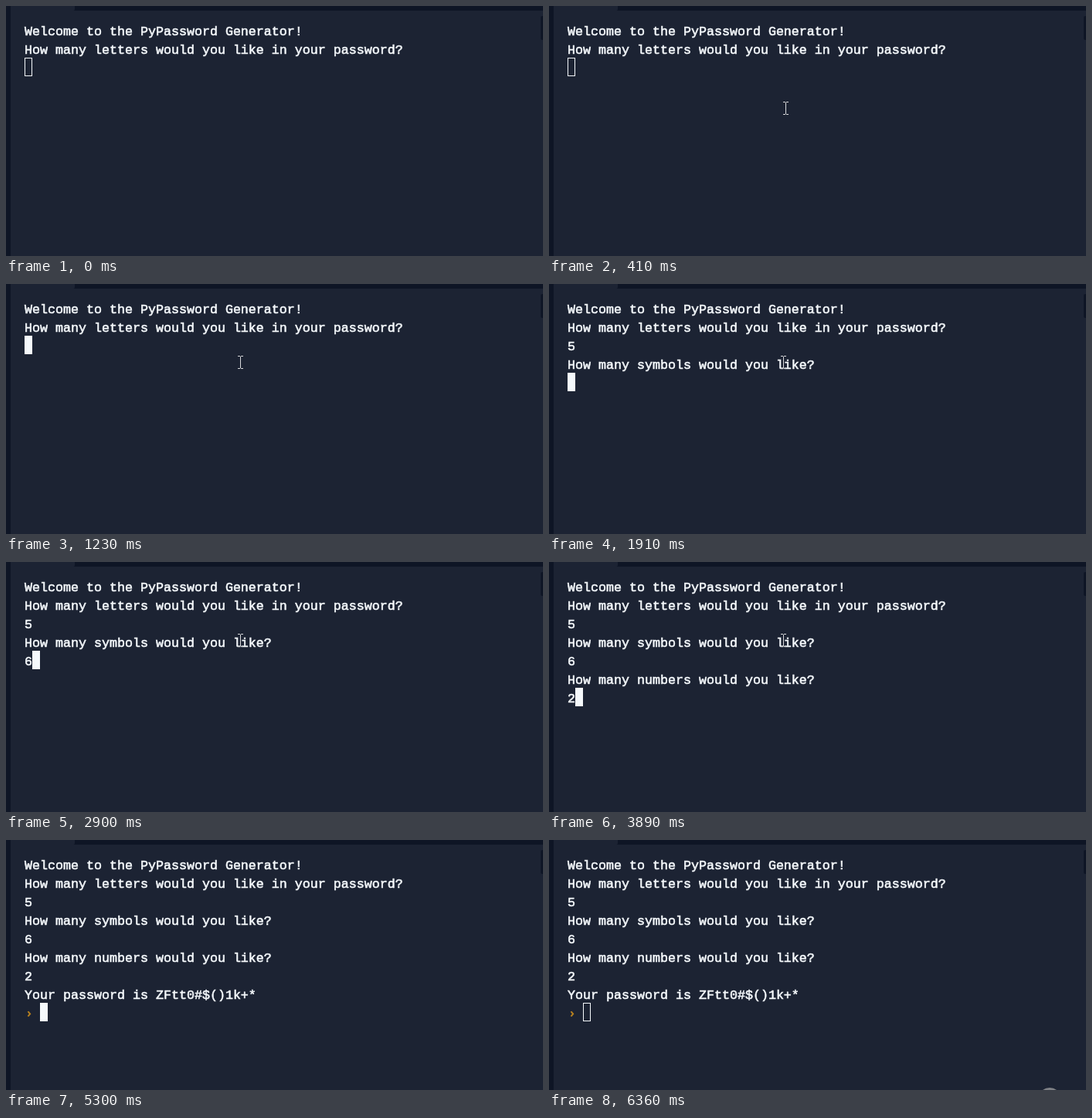
These frames come from a looping animation (695x324 px, 6580 ms). An HTML page:

```html
<!DOCTYPE html>
<html lang="en">
<head>
<meta charset="utf-8">
<title>Password generator</title>
<style>
html, body { margin: 0; width: 100%; height: 100%; overflow: hidden; background: #0e1525; }
div, pre, svg { position: absolute; box-sizing: border-box; }
#stage { left: 0; top: 0; width: 695px; height: 324px; overflow: hidden; }
#tab { left: 6px; top: 0; width: 83px; height: 6px; background: #1c2333; border-radius: 0 0 2px 0; }
#panel { left: 6px; top: 6px; width: 689px; height: 318px; background: #1c2333; }
#bar { left: 692px; top: 13px; width: 3px; height: 31px; background: #0e1525; border-radius: 2px 0 0 2px; }
#text {
  left: 24px; top: 22px; margin: 0; color: #f5f9fc;
  font: 16.667px/24px "Liberation Mono", monospace;
  -webkit-text-stroke: .6px #f5f9fc;
}
#prompt { left: 25px; top: 212px; color: #b9821f; font: 700 16.667px/24px "Noto Sans Mono", monospace; }
#caret { width: 10px; height: 24px; border: 1px solid #f5f9fc; }
#caret.focus { background: #f5f9fc; }
#click { width: 30px; height: 30px; border-radius: 50%; background: rgba(170, 170, 170, .7); }
#mouse { width: 8px; height: 17px; }
</style>
</head>
<body>
<div id="stage">
  <div id="tab"></div>
  <div id="panel"></div>
  <div id="bar"></div>
  <pre id="text"></pre>
  <div id="prompt">›</div>
  <div id="caret"></div>
  <div id="click"></div>
  <svg id="mouse" viewBox="0 0 8 17" fill="none" stroke="#d9dadc" shape-rendering="crispEdges">
    <path d="M0 .5H3M4 .5H7M3.5 1V16M0 16.5H3M4 16.5H7"/>
  </svg>
</div>
<script>
const LOOP = 6580;
const STEP = 68;
const $ = id => document.getElementById(id);

// Terminal output: [time, text added]
const output = [
  [0, "Welcome to the PyPassword Generator!\nHow many letters would you like in your password?\n"],
  [1830, "5"],
  [1910, "\nHow many symbols would you like?\n"],
  [2900, "6"],
  [2960, "\nHow many numbers would you like?\n"],
  [3890, "2"],
  [4020, "\nYour password is ZFtt0#$()1k+*\n  "]
];

// Pointer positions, one per STEP from the start of each move
const enter = [[535, 282], [455, 254], [384, 211], [337, 158], [306, 132], [304, 119], [303, 109], [303, 103], [303, 101]];
const leave = [[309, 101], [324, 95], [352, 101], [394, 124], [446, 166], [505, 217], [565, 270], [619, 317], [650, 337]];
const sample = (path, age) => path[Math.min(path.length - 1, Math.floor(age / STEP))];

function show(id, visible) {
  $(id).style.display = visible ? "block" : "none";
}

function place(id, x, y) {
  $(id).style.left = x + "px";
  $(id).style.top = y + "px";
}

function draw(t) {
  const text = output.filter(([start]) => t >= start).map(([, part]) => part).join("");
  const lines = text.split("\n");
  if ($("text").textContent !== text) $("text").textContent = text;
  show("prompt", t >= 4020);
  place("caret", 24 + 10 * lines.at(-1).length, 19 + 24 * (lines.length - 1));
  $("caret").className = t >= 1030 && t < 6360 ? "focus" : "";

  const [x, y] = t < 4750 ? sample(enter, Math.max(0, t - 130)) : sample(leave, t - 4750);
  place("mouse", x - 3, y - 8);
  show("mouse", t >= 130);

  place("click", x - 17, y - 16);
  show("click", t >= 960 && t < 1230 || t >= 6360);
}

function tick() {
  draw(performance.now() % LOOP);
  requestAnimationFrame(tick);
}
tick();
</script>
</body>
</html>
```
